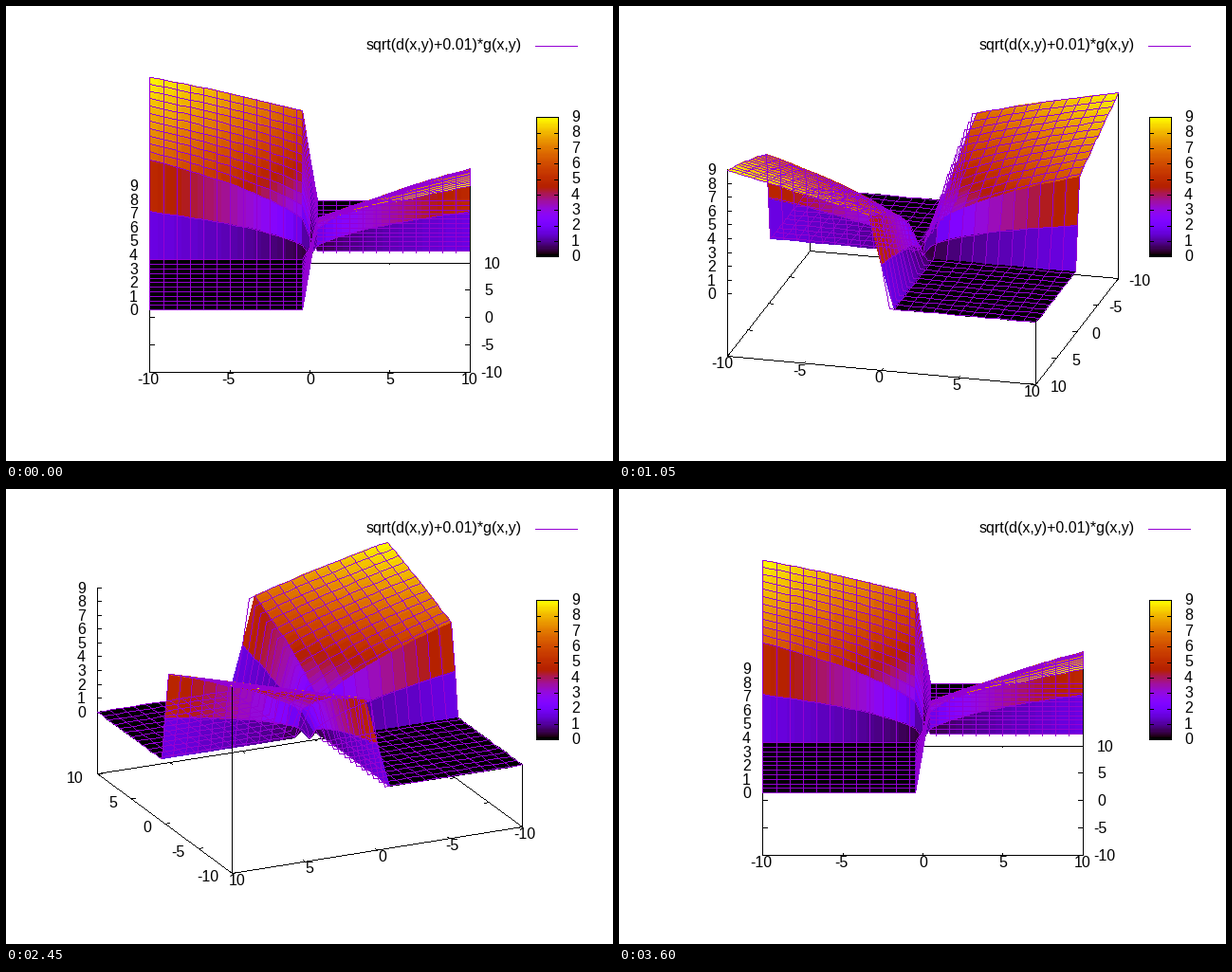
Recreate the animation shown at these times as a matplotlib script. Size 640x480 px, loop 3.65 s.

```python
import numpy as np
import matplotlib
import matplotlib.pyplot as plt
from matplotlib.animation import FuncAnimation
from matplotlib.collections import PolyCollection

W, H, DPI = 640, 480, 100
PX = 72 / DPI                     # one pixel in points
CX, CY, SCALE, ZSCALE = 320, 328.22, 16.8501, 14.58
TILT = np.cos(np.radians(70))
FLOOR = -4.5                      # base plane, half the z range below zero
FRAMES, STEP, INTERVAL = 73, 5, 50
PURPLE, BLACK = (148, 0, 211, 255), (0, 0, 0, 255)
TIC, H_CHAR, V_CHAR = 5, 11.5, 22
DIGIT, MINUS, SPACE = 8.9, 5.33, 4.45
SHADES = 128

matplotlib.rcParams["font.family"] = "Liberation Sans"
matplotlib.rcParams["font.size"] = 16 * PX


def surface(x, y):
    return np.sqrt(abs(x) + abs(y) + 0.01) * abs(np.sign(x) - np.sign(y))


def palette(g):
    """Red sqrt(g), green g^3, blue sin(2 pi g), in a limited number of shades."""
    g = np.minimum(np.floor(g * SHADES), SHADES - 1) / (SHADES - 1)
    rgb = [np.sqrt(g), g ** 3, np.sin(2 * np.pi * g)]
    return np.clip(np.stack(rgb, axis=-1), 0, 1)


def project(x, y, z, rot):
    c, s = np.cos(rot), np.sin(rot)
    px = CX + SCALE * (x * c + y * s)
    py = CY - SCALE * TILT * (y * c - x * s) - ZSCALE * (z - FLOOR)
    return np.stack(np.broadcast_arrays(px, py), axis=-1)


def pixel(p):
    return np.floor(np.asarray(p) + 0.5).astype(int)


def trace(canvas, a, b, color):
    """Draw one-pixel lines without smoothing from points a to points b."""
    a, b = pixel(a), pixel(b)
    n = abs(b - a).max(axis=1)
    line = np.repeat(np.arange(len(a)), n + 1)
    first = np.cumsum(n + 1) - (n + 1)
    t = (np.arange(len(line)) - first[line]) / np.maximum(n, 1)[line]
    x, y = pixel(a[line] + (b - a)[line] * t[:, None]).T
    canvas[y, x] = color


def trace_edges(canvas, edges, color):
    edges = np.array(edges, dtype=float)
    trace(canvas, edges[:, 0], edges[:, 1], color)


def trace_rows(canvas, p, color):
    trace(canvas, p[:, :-1].reshape(-1, 2), p[:, 1:].reshape(-1, 2), color)


def blank():
    return np.zeros((H, W, 4), np.uint8)


fine = np.linspace(-10, 10, 41).round(9)
coarse = np.linspace(-10, 10, 25).round(9)
ROWS = np.meshgrid(fine, coarse)                    # constant y per row
COLS = np.meshgrid(coarse, fine, indexing="ij")     # constant x per row
ROWS_Z, COLS_Z = surface(*ROWS), surface(*COLS)
MEAN_Z = (ROWS_Z[:-1, :-1] + ROWS_Z[1:, :-1] + ROWS_Z[1:, 1:] + ROWS_Z[:-1, 1:]) / 4
COLORS = palette(MEAN_Z / 9)

fig = plt.figure(figsize=(W / DPI, H / DPI), dpi=DPI, facecolor="white")
ax = fig.add_axes([0, 0, 1, 1])


def layer(zorder):
    return ax.imshow(blank(), extent=(0, W, H, 0), aspect="auto",
                     interpolation="nearest", zorder=zorder)


def put_text(x, y, s):
    return ax.text(x, y, s, ha="left", va="baseline", zorder=6)


# fixed parts: key and colour box
put_text(380, 46, "sqrt(d(x,y)+0.01)*g(x,y)")
fixed = blank()
trace_edges(fixed, [[(558, 42), (602, 42)]], PURPLE)
ramp = palette(np.linspace(1, 0, 147))
fixed[117:264, 559:583, :3] = np.round(ramp * 255)[:, None]
fixed[117:264, 559:583, 3] = 255
box = [[(559, 117), (582, 117)], [(559, 264), (582, 264)],
       [(559, 117), (559, 264)], [(582, 117), (582, 264)]]
for v in range(10):
    level = 264 - 147 * v / 9
    y = np.ceil(level)
    box += [[(559, y), (563, y)], [(578, y), (582, y)]]
    put_text(596, round(level + 5), str(v))
trace_edges(fixed, box, BLACK)

back = layer(1)
back.set_data(fixed)
sheet = ax.add_collection(
    PolyCollection([], edgecolors="none", linewidths=0, antialiaseds=False, zorder=2),
    autolim=False)
front = layer(3)
labels = [put_text(0, 0, "") for _ in range(20)]

ax.set_xlim(0, W)
ax.set_ylim(H, 0)
ax.axis("off")


def place(label, value, x, y, just):
    """Positive numbers keep a leading blank, as in the '% h' format."""
    s = str(value)
    lead = 0 if value < 0 else SPACE
    width = lead + sum(MINUS if ch == "-" else DIGIT for ch in s)
    start = {"left": x, "center": x - 2 - width / 2, "right": x - 4 - width}[just]
    label.set_text(s)
    label.set_position((round(start + lead), round(y + 6)))


def draw_axis(point, out, names):
    """Tics on an edge and its mirror; point(v, side) gives a floor position."""
    near, far = [], []
    for v, label in zip(range(-10, 11, 5), names):
        p, q = point(v, 1), point(v, -1)
        near.append([p, p - TIC * out])
        far.append([q, q + TIC * out])
        just = "left" if out[0] > 0.74 else "right" if out[0] < -0.74 else "center"
        place(label, v, p[0] + H_CHAR * out[0], p[1] + V_CHAR * out[1], just)
    return near, far


def draw_box(rot, quad):
    """Place the labels; return the box lines behind and before the surface."""
    x_side = 10 if quad in (0, 1) else -10      # where the y axis stands
    y_side = 10 if quad in (1, 2) else -10      # where the x axis stands
    ring = [(-10, -10), (10, -10), (10, 10), (-10, 10)]
    left, near, right, rear = [ring[(quad + k) % 4] for k in range(4)]

    def edge(a, b):
        return [project(*a, FLOOR, rot), project(*b, FLOOR, rot)]

    def upright(corner, top):
        return [project(*corner, FLOOR, rot), project(*corner, top, rot)]

    c, s = np.cos(rot), np.sin(rot)
    x_out = np.sign(y_side) * np.array([s, -c * TILT])
    y_out = np.sign(x_side) * np.array([c, s * TILT])
    x_near, x_far = draw_axis(lambda v, k: project(v, k * y_side, FLOOR, rot),
                              x_out, labels[:5])
    y_near, y_far = draw_axis(lambda v, k: project(k * x_side, v, FLOOR, rot),
                              y_out, labels[5:10])

    behind = [edge(left, rear), edge(rear, right), upright(left, 9)]
    behind += [upright(k, surface(*k)) for k in (rear, right)]
    for v, label in enumerate(labels[10:]):
        p = project(*left, v, rot)
        behind.append([p, p + (4, 0)])
        label.set_text(str(v))
        label.set_position((round(p[0] - 21), round(p[1] + 6)))
    before = [edge(left, near), edge(near, right), upright(near, surface(*near))]
    return behind + x_far + y_far, before + x_near + y_near


def update(n):
    deg = n * STEP % 360
    rot, quad = np.radians(deg), deg // 90
    p = project(*ROWS, ROWS_Z, rot)
    corners = pixel(p) + 0.5
    quads = np.stack([corners[:-1, :-1], corners[1:, :-1],
                      corners[1:, 1:], corners[:-1, 1:]], axis=2)
    # paint from the far side to the near side
    row_dir = -1 if quad in (0, 3) else 1
    col_dir = 1 if quad in (0, 1) else -1
    order = (slice(None, None, row_dir), slice(None, None, col_dir))
    sheet.set_verts(quads[order].reshape(-1, 4, 2))
    sheet.set_facecolor(COLORS[order].reshape(-1, 3))

    behind, before = draw_box(rot, quad)
    under, over = fixed.copy(), blank()
    trace_edges(under, behind, BLACK)
    trace_rows(over, p, PURPLE)
    trace_rows(over, project(*COLS, COLS_Z, rot), PURPLE)
    trace_edges(over, before, BLACK)
    back.set_data(under)
    front.set_data(over)
    return [back, sheet, front, *labels]


anim = FuncAnimation(fig, update, frames=FRAMES, interval=INTERVAL,
                     repeat=True, repeat_delay=0, blit=False)
plt.show()
```
